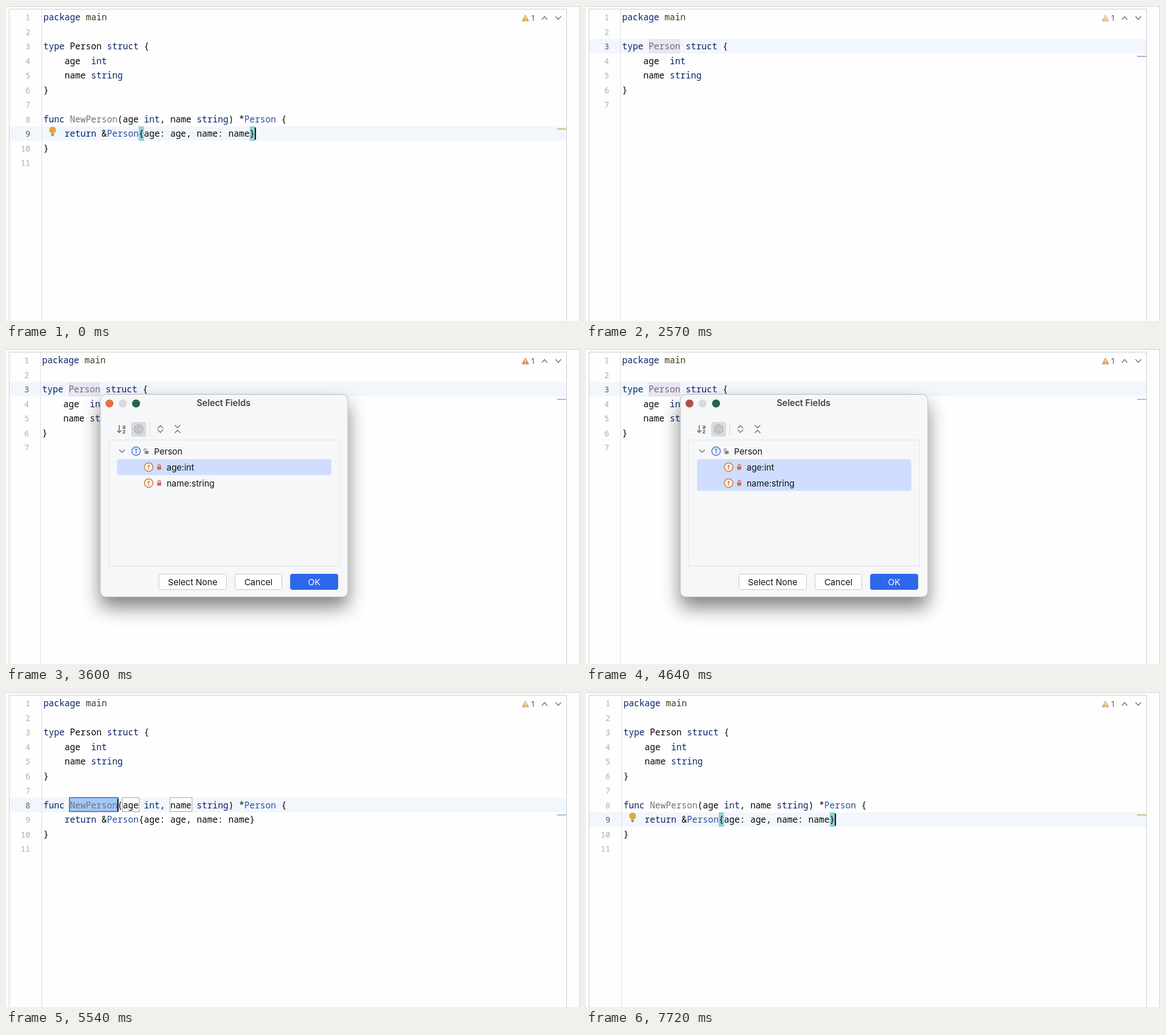
These frames come from a looping animation (1004 px wide and 552 px high, 8000 ms). An HTML page:

```html
<!DOCTYPE html>
<html lang="en">
<head>
<meta charset="utf-8">
<title>Generate constructor</title>
<style>
  html, body { margin: 0; width: 100%; height: 100%; overflow: hidden; background: #fefefe; }
  svg { display: block; width: 1004px; height: 552px; }
  text { font: 15px Inter, sans-serif; fill: #111; white-space: pre; }
  .code { font: 500 15.42px "Noto Sans Mono", monospace; fill: #080808; }
  .number { font: 14px "Noto Sans Mono", monospace; fill: #abadb9; text-anchor: end; }
  .number.active { fill: #55565f; }
  .middle { text-anchor: middle; }
  .title { font-weight: 600; font-size: 15.3px; fill: #404040; }
  .icon { fill: none; stroke: #6a6c74; stroke-width: 1.3; stroke-linecap: round; stroke-linejoin: round; }
</style>
</head>
<body>
<svg id="stage" viewBox="0 0 1004 552" xmlns="http://www.w3.org/2000/svg"></svg>
<script>
const LOOP = 8000, CHAR = 9.25, LINE = 25.5, LEFT = 65.5;
const stage = document.getElementById('stage');

const structCode = ['package main', '', 'type Person struct {', '    age  int', '    name string', '}', ''];
const fullCode = [...structCode, 'func NewPerson(age int, name string) *Person {',
  '    return &Person{age: age, name: name}', '}', ''];

// Template variables on line 8: first column and length
const variables = [[5, 9], [15, 3], [24, 4]];

const finished = { full: true, line: 8, caret: 40, braces: true, warn: '#d3b87a', mark: '#d3b66a' };
const editing = { line: 2, warn: '#dcae55', mark: '#b5b0d2' };
const dialog = { ...editing, warn: '#e09060', mark: '#b0b3b8' };
const template = { full: true, line: 7, warn: '#d0b878', mark: '#a9b7bf' };
const select = index => ({ ...template, selected: index, caret: variables[index][0] + variables[index][1] });

const phases = [
  [0, { ...finished, bulb: true, warn: '#dcae4f', mark: '#d9b45b' }],
  [500, { ...editing, caret: 7 }],
  [900, { ...editing, caret: 7, bulb: true }],
  [2570, { ...editing, warn: '#d8c48c', mark: '#aaa3d8' }],
  [2640, { ...dialog, rows: 1, close: '#e2714f' }],
  [3700, { ...dialog, rows: 2, close: '#b0504a', warn: '#dea368' }],
  [4850, select(0)],
  [6230, select(1)],
  [6440, select(2)],
  [6650, finished],
  [7300, { ...finished, bulb: true }]
];

const column = c => LEFT + c * CHAR;
const lineTop = i => 6.8 + i * LINE;
const rect = (x, y, w, h, fill, more = '') =>
  `<rect x="${x}" y="${y}" width="${w}" height="${h}" fill="${fill}" ${more}/>`;
const circle = (x, y, r, fill, more = '') => `<circle cx="${x}" cy="${y}" r="${r}" fill="${fill}" ${more}/>`;
const label = (x, y, words, cls = '', more = '') => `<text x="${x}" y="${y}" class="${cls}" ${more}>${words}</text>`;
const icon = (d, more = '') => `<path class="icon" d="${d}" ${more}/>`;
const chevron = (x, y, dy, w = 4.5) => icon(`M${x - w} ${y - dy / 2}l${w} ${dy}l${w} ${-dy}`);
const cells = (line, from, count, fill) => rect(column(from), lineTop(line), count * CHAR, LINE, fill);

function paint(source, full) {
  return source.replace('&', '&amp;').replace(
    /\b(package|type|struct|func|return|int|string|main|NewPerson|Person)\b/g,
    (word, _, at, all) => {
      let color = '#0a2468';
      if (word === 'main') color = '#40391f';
      if (word === 'NewPerson') color = '#737373';
      if (word === 'Person') color = !full ? '#737078' : /[*;]/.test(all[at - 1]) ? '#2c529b' : '#080808';
      return `<tspan fill="${color}">${word}</tspan>`;
    });
}

function templateBoxes(selected) {
  return variables.map(([from, count], i) => {
    const on = i === selected;
    return rect(column(from) - .8, lineTop(7) - .3, count * CHAR + 1.6, LINE - 1,
      on ? '#a3c8f8' : '#fefefe', `stroke="${on ? '#446796' : '#a0a0a0'}" stroke-width="${on ? 1.5 : 1}"`);
  }).join('');
}

function bulb(y) {
  return circle(81.5, y, 6, '#e0a740') + rect(78.8, y + 3, 5.4, 4, '#e0a740') +
    icon(`M79.3 ${y + 8.2}h4.4M80.3 ${y + 10}h2.4`, 'style="stroke:#77715f"');
}

function editor(p) {
  const y = lineTop(p.line);
  let out = rect(6, y, 974, LINE, '#f2f6fd') + `<g transform="translate(${p.full ? 0 : -2.2})">`;
  out += rect(62, 6, 1, 546, '#dcdde0');
  if (!p.full) out += cells(2, 5, 6, '#e8e5f4');
  if (p.braces) out += cells(8, 18, 1, '#93d0d7') + cells(8, 39, 1, '#93d0d7');
  if (p.selected !== undefined) out += templateBoxes(p.selected);
  (p.full ? fullCode : structCode).forEach((source, i) => {
    const base = 25.3 + i * LINE;
    out += label(42.5, base - .3, i + 1, 'number' + (i === p.line ? ' active' : ''));
    out += label(LEFT, base, paint(source, p.full), 'code', 'xml:space="preserve"');
  });
  if (p.bulb) out += bulb(p.full ? 217.3 : 45.3);
  if (p.caret) out += rect(column(p.caret) - .3, y + 2, 2, 21.5, '#000');
  return out + '</g>' + rect(964, p.full ? 214.5 : 87.3, 16, 2, p.mark);
}

function frame(p) {
  const lines = 'M0 .5H1003.5V552M5.5 552V5.5H980.5V552';
  return `<path d="${lines}" fill="none" stroke="#cbcbcb"/>` +
    `<path d="M908.5 15.5l6 11h-12z" fill="${p.warn}" stroke="${p.warn}" stroke-linejoin="round"/>` +
    rect(907.8, 18.5, 1.5, 4, '#fff') + rect(907.8, 24, 1.5, 1.5, '#fff') +
    label(921.5, 26, 1, 'middle', 'style="font-size:13px;fill:#55565a"') +
    chevron(942, 21, -5) + chevron(966, 21, 5);
}

function badge(x, y, letter, color, fill) {
  return circle(x, y, 7.5, fill, `stroke="${color}" stroke-width="1.4"`) +
    label(x, y + 4, letter, 'middle', `style="font-size:11px;font-weight:500;fill:${color}"`);
}

function lock(x, y, color, open) {
  return rect(x - 3.5, y - 1, 7, 5.5, color, 'rx="1"') +
    icon(`M${x - 2} ${y - 1}v-1.5a2 2 0 0 1 4 0${open ? '' : 'v1.5'}`,
      `style="stroke:${color}" ${open ? 'transform="translate(-2.5)"' : ''}`);
}

function button(x, w, words, primary) {
  return rect(x, 394.5, w, 27, primary ? '#2d67eb' : '#fff',
    `rx="3" stroke="${primary ? '#2d67eb' : '#c4c6cc'}"`) +
    label(x + w / 2, 413.5, words, 'middle', primary ? 'style="fill:#fff"' : '');
}

function fieldsDialog(p) {
  const fields = ['age:int', 'name:string'].map((words, i) => {
    const y = 207 + i * 28;
    return badge(249.5, y, 'f', '#c4733f', '#fdf1e4') + lock(268, y, '#cf6b50') + label(281, y + 5.5, words);
  }).join('');
  return `<filter id="shadow" x="-20%" y="-20%" width="140%" height="150%">
      <feDropShadow dx="0" dy="18" stdDeviation="16" flood-opacity=".48"/></filter>` +
    rect(165, 79.5, 433, 355, '#f6f7f9', 'rx="10" stroke="#b4b5b8" filter="url(#shadow)"') +
    circle(181, 95.5, 7, p.close) + circle(204.2, 95.5, 7, '#dadbdc') + circle(227.5, 95.5, 7, '#25644a') +
    label(380.5, 100.3, 'Select Fields', 'middle title') +
    icon('M198 134v12.5m-3.2-3.2l3.2 3.2l3.2-3.2', 'style="stroke-width:1.6"') +
    label(206.3, 139.8, 'a', 'middle', 'style="font-size:10px;font-weight:700;fill:#5d5f66"') +
    label(206.3, 147.8, 'z', 'middle', 'style="font-size:10px;font-weight:700;fill:#5d5f66"') +
    rect(219, 128, 26, 25.5, '#d9dadc', 'rx="3"') + badge(232, 140.5, 'C', '#a9abae', '#cccdd0') +
    rect(251, 129, 1, 23, '#d5d6d9') +
    chevron(270, 136.5, -4.5) + chevron(270, 144, 4.5) +
    chevron(300, 136, 4.5) + chevron(300, 144.5, -4.5) +
    rect(179.5, 159.5, 404, 221, 'none', 'stroke="#e2e3e6"') +
    rect(194, 193, 375, 27.7 * p.rows, '#cfdefe', 'rx="4"') +
    chevron(203, 179, 4.5) + badge(227.5, 179, 'T', '#4a6fd0', '#e9effd') +
    lock(246, 179.5, '#85878c', true) + label(259, 184.5, 'Person') + fields +
    button(267.5, 118, 'Select None') + button(400.5, 82, 'Cancel') + button(497.5, 83, 'OK', true);
}

let shown;
function tick(now) {
  const time = now % LOOP;
  const phase = phases.findLast(([start]) => start <= time)[1];
  if (phase !== shown) {
    shown = phase;
    stage.innerHTML = editor(phase) + frame(phase) + (phase.rows ? fieldsDialog(phase) : '');
  }
  requestAnimationFrame(tick);
}
const begin = performance.now();
tick(0);
requestAnimationFrame(function loop(now) {
  tick = t => {
    const time = Math.max(0, t - begin) % LOOP;
    const phase = phases.findLast(([start]) => start <= time)[1];
    if (phase !== shown) {
      shown = phase;
      stage.innerHTML = editor(phase) + frame(phase) + (phase.rows ? fieldsDialog(phase) : '');
    }
    requestAnimationFrame(tick);
  };
  tick(now);
});
</script>
</body>
</html>
```
